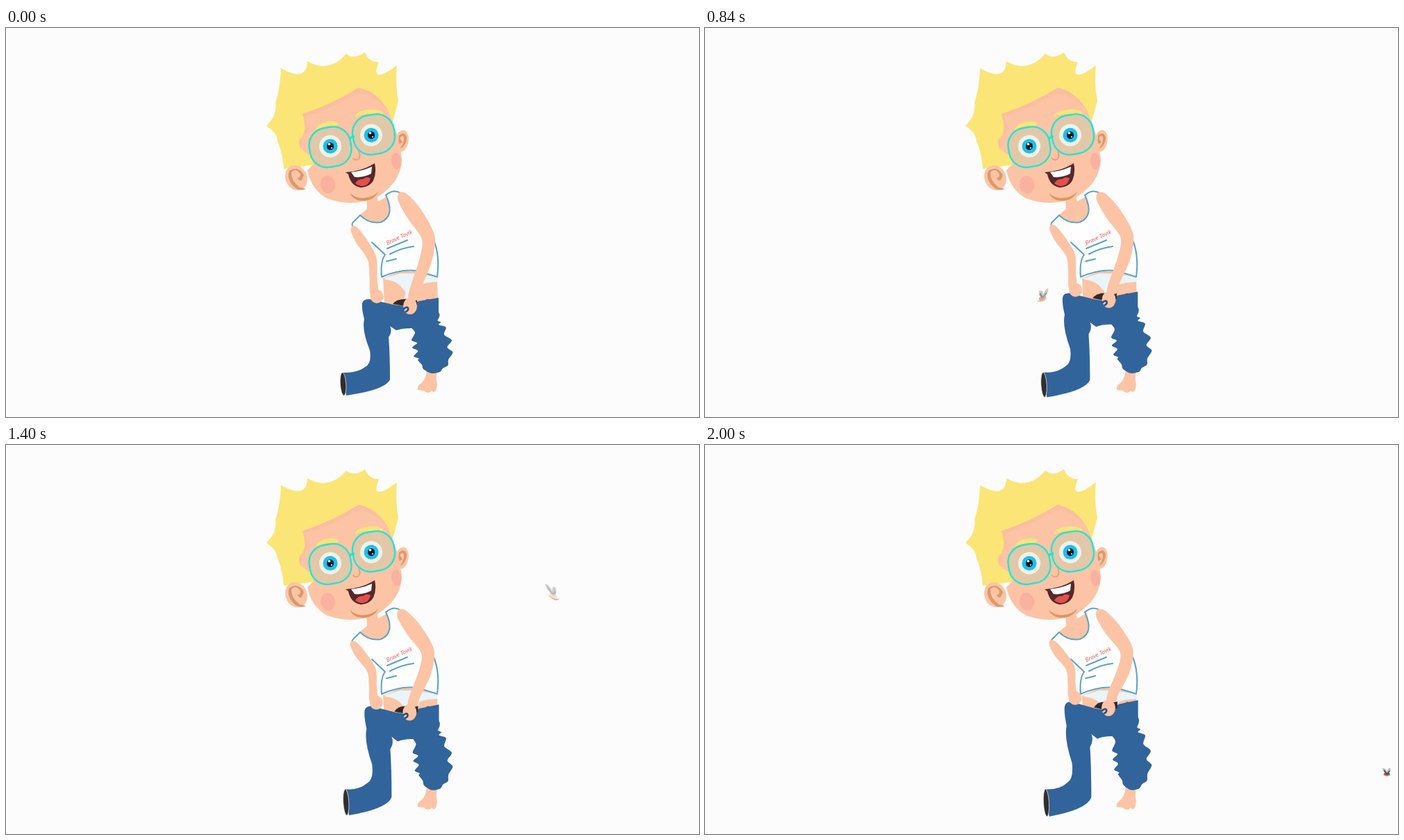
An HTML page for the animation above (2.04 s loop, 998x561 px).

```html
<!DOCTYPE html>
<html lang="en">
<head>
<meta charset="utf-8">
<title>Getting dressed</title>
<style>
  html, body { margin: 0; width: 100%; height: 100%; overflow: hidden; background: #fcfcfc; }
  svg { display: block; width: 100vw; height: 100vh; }
  .skin { fill: #fcc4a5; }
  .hair { fill: #fbe576; }
  .cloth { fill: #31649b; }
  .line { fill: none; stroke: #5aa2c8; stroke-width: 2; stroke-linecap: round; stroke-linejoin: round; }
  .ear { fill: #d99a6c; }
  .blush { fill: #fab1a0; }
  .lens { fill: #e2c8a8; stroke: #1de6d6; stroke-width: 2.4; }
  .shirt-text { font: italic 8.2px "Open Sans", "Noto Sans", sans-serif; fill: #e8574f; }
</style>
</head>
<body>
<svg viewBox="0 0 998 561" preserveAspectRatio="none">
  <defs>
    <g id="eye">
      <circle r="16" fill="#edf3e9"/>
      <circle r="10.5" fill="#1fbfea"/>
      <ellipse rx="5" ry="5.6" fill="#111b26"/>
      <circle cx="-1.5" cy="-3" r="1.8" fill="#fff"/>
      <circle cx="2" cy="2.4" r="1" fill="#fff"/>
    </g>
    <rect id="lens" x="-30" y="-28.500" width="60" height="57" rx="25" transform="rotate(-10)"/>
  </defs>

  <!-- hips and bare foot -->
  <path class="skin" d="M543 361L568 351H592L621 361L622 400L545 402Z"/>
  <path fill="#e9f5fb" d="M544 361L568 354H590L621 360V366Q603 367 596 370L588 390H573Q577 382 574 379Q564 364 547 363Z"/>
  <path class="skin" d="M606 492H622Q618 504 621 514Q619 530 613 523Q608 529 602 523L593 522Q592 516 597 513Q605 507 606 492Z"/>

  <g id="pants">
    <path class="cloth" d="M513 397Q514 391 523 391L558 399L580 402L594 394L623 389V410L600 434Q575 431 562 436L553 430Q557 438 551 446Q553 470 553 507Q546 522 490 530L484 497Q505 498 517 489Q527 484 524 465Q512 435 516 420Q512 405 513 397Z"/>
    <path id="wrinkled" class="cloth"/>
    <path fill="#2e2b2b" d="M557 398Q562 391 574 391H592V399L574 401Z"/>
    <ellipse cx="485.500" cy="513.500" rx="4.200" ry="16.600" transform="rotate(-4 485 513)" fill="#302e2f" stroke="#eee" stroke-width=".7"/>
  </g>

  <!-- vest -->
  <path class="skin" d="M519 243L520 261L509 270Q532 286 547 276Q559 264 549 243L536 250L534 243Z"/>
  <path fill="#fefefe" d="M499 284L510 270Q523 283 540 280Q561 271 547 241L558 234L568 238L616 308Q623 328 621 359Q585 342 541 359Q539 336 546 327L527 309Z"/>
  <path class="line" d="M500 289Q497 282 500 280L510 270Q523 283 540 280Q561 271 547 241Q558 232 568 238"/>
  <path class="line" d="M527 309L546 327Q539 336 541 359Q568 347 592 350Q608 355 621 359Q625 328 616 306"/>
  <path class="line" d="M549 318L578 306M553 326Q570 317 587 315M548 336.500L562 333"/>
  <text class="shirt-text" transform="translate(549 313) rotate(-25)">Brave Tovik</text>

  <path id="armL" class="skin"/>
  <path id="armR" class="skin"/>
  <g id="hands">
    <ellipse class="skin" cx="534" cy="387" rx="9.500" ry="10"/>
    <ellipse class="skin" cx="582" cy="401" rx="10" ry="12"/>
    <path fill="none" stroke="#274f82" stroke-width="2.600" stroke-linecap="round" d="M573 405Q578 401 579 404Q580 407 576 409"/>
  </g>

  <!-- head -->
  <path id="mop" class="hair"/>
  <ellipse class="skin" cx="418" cy="216" rx="15.500" ry="18.500" transform="rotate(-22 418 216)"/>
  <path class="ear" d="M408 206Q421 198 429 212Q428 216 425 220Q421 220 420 216Q424 216 424 211Q418 201 411 208Q410 220 423 230L432 232Q421 237 412 226Q404 215 408 206Z"/>
  <ellipse class="skin" cx="570" cy="163" rx="9.500" ry="16" transform="rotate(10 570 163)"/>
  <path class="ear" d="M566 155Q574 148 577 158Q577 169 567 175Q574 165 573 158Q571 153 567 159L571 165L565 168Z"/>
  <path class="skin" d="M427 124Q472 109 508 86Q545 95 557 137Q567 160 570 190Q569 222 535 244Q500 259 463 246Q440 234 434 205L443 196L440 184Q423 178 422 164Q438 152 427 124Z"/>
  <path fill="#f9bda0" d="M427 124Q472 109 508 86Q536 92 552 122Q525 90 502 96Q472 115 431 128L437 146Q426 157 425 176Q418 160 427 156Q433 145 427 124Z" opacity=".7"/>
  <ellipse class="blush" cx="463.500" cy="226" rx="10.500" ry="13" transform="rotate(-12 463 226)"/>
  <ellipse class="blush" cx="562" cy="192" rx="7" ry="12" transform="rotate(-5 562 192)"/>
  <path class="hair" d="M444 150Q449 137 463 135Q475 133 479 138Q476 143 466 141Q454 141 444 150Z"/>
  <path class="hair" d="M503 129Q503 121 515 119Q533 115 544 122Q542 126 528 124Q513 123 503 129Z"/>
  <use href="#lens" class="lens" x="0" transform="translate(467 171.700)"/>
  <use href="#lens" class="lens" x="0" transform="translate(529.500 153.500)"/>
  <path d="M495 160Q498 156 502 157" fill="none" stroke="#1de6d6" stroke-width="3"/>
  <use href="#eye" x="467" y="170.500"/>
  <use href="#eye" x="526" y="154.500"/>
  <path d="M508 178Q512 187 506 190Q502 191 500 188" fill="none" stroke="#e3a078" stroke-width="1.800" stroke-linecap="round"/>
  <path fill="#57282a" d="M489 208Q512 207 531 195Q534 209 529 220Q524 229 512 230Q497 229 493 211Z"/>
  <path fill="#fff" d="M497 208Q514 206 527 200L526 210Q515 216 502 215Z"/>
  <path fill="#e4504c" d="M503 224Q507 217 514 218Q520 213 525 217Q523 227 513 228Q507 228 503 224Z"/>
  <path fill="#d99660" d="M495 238Q506 247 517 245Q529 244 536 236Q530 249 514 249Q500 249 495 238Z"/>

  <g id="fly">
    <path id="wings" d="M0 2Q-7-1-6-6Q-1-6 0-1Q2-7 5-6Q7-1 0 2Z"/>
    <path fill="#e9a27e" d="M-7 3Q0 7 7 3Q4 6 0 6Q-4 6-7 3Z"/>
    <g id="bug">
      <ellipse cy="2.500" rx="4.500" ry="2.300" fill="#b5533f"/>
      <path d="M-4-3L0 3L4-2" fill="none" stroke="#3d5557" stroke-width="1.800"/>
    </g>
  </g>
</svg>

<script>
  const LOOP = 2040, STEP = 40, LIFT = 22;
  const $ = id => document.getElementById(id);
  const lerp = (a, b, u) => a.map((v, i) => v + (b[i] - v) * u);

  // Smooth closed curve through points
  function smooth(points) {
    const n = points.length, at = i => points[(i + n) % n];
    let d = "M" + at(0);
    for (let i = 0; i < n; i++) {
      const c1 = at(i).map((v, k) => v + (at(i + 1)[k] - at(i - 1)[k]) / 7);
      const c2 = at(i + 1).map((v, k) => v - (at(i + 2)[k] - at(i)[k]) / 7);
      d += `C${c1} ${c2} ${at(i + 1)}`;
    }
    return d + "Z";
  }

  // Rounded limb along joints [x, y, radius]
  function limb(joints) {
    const last = joints.length - 1, left = [], right = [];
    joints.forEach(([x, y, r], i) => {
      const a = joints[Math.max(0, i - 1)], b = joints[Math.min(last, i + 1)];
      const len = Math.hypot(b[0] - a[0], b[1] - a[1]);
      const ux = (b[0] - a[0]) / len * r, uy = (b[1] - a[1]) / len * r;
      if (i === 0) left.push([x - ux, y - uy]);
      left.push([x + uy, y - ux]);
      right.unshift([x - uy, y + ux]);
      if (i === last) left.push([x + ux / 3, y + uy / 3]);
    });
    return smooth([...left, ...right]);
  }

  // Trouser leg with folds that are strongest in the middle
  function wrinkled(joints, folds, depth) {
    const rows = Array.from({ length: folds + 1 }, (_, i) => {
      const u = i / folds * (joints.length - 1), j = Math.min(joints.length - 2, Math.floor(u));
      const [x, y, r] = lerp(joints[j], joints[j + 1], u - j);
      return [x, y, r + depth * Math.sin(Math.PI * i / folds) * (i % 2 ? 1 : -1)];
    });
    return limb(rows);
  }

  // Hair tips [x, y, depth of the hollow that follows]
  function tufts(tips) {
    const center = [475, 140];
    return tips.reduce((d, tip, i) => {
      const next = tips[(i + 1) % tips.length], mid = lerp(tip.slice(0, 2), next, 0.5);
      return d + `Q${lerp(mid, center, 2 * tip[2])} ${next.slice(0, 2)}`;
    }, "M" + tips[0].slice(0, 2)) + "Z";
  }

  $("mop").setAttribute("d", tufts([
    [563, 54, .18], [537, 49, .04], [517, 35, .05], [490, 37, .12], [434, 48, .15],
    [396, 58, .02], [388, 108, .05], [375, 141, .04], [391, 163, .02], [400, 203, 0],
    [445, 197, 0], [556, 138, 0], [565, 105, .02]
  ]));
  $("wrinkled").setAttribute("d", wrinkled(
    [[606, 408, 17], [604, 428, 20], [613, 452, 25], [616, 476, 25], [613, 494, 12]], 13, 4));

  const arms = {
    armL: [[501, 290, 5], [511, 306, 7.5], [527, 332, 6.5], [529, 360, 5.5], [530, 382, 6]],
    armR: [[571, 244, 8], [588, 268, 11.5], [608, 302, 9.5], [604, 336, 9], [590, 374, 7.5], [586, 390, 7]]
  };

  // Lower parts of an arm follow the hand more closely
  const raise = (joints, k) => joints.map(([x, y, r]) =>
    [x - k, y - LIFT * k * Math.max(0, (y - 240) / 150) ** 1.5, r]);

  // Flight path: time, x, y
  const flight = [
    [80, 13, 500], [280, 198, 526], [600, 391, 483], [1040, 567, 272],
    [1260, 694, 125], [1400, 787, 213], [1680, 895, 442], [2000, 982, 472]
  ];

  function slope(i, k) {
    const rate = j => (flight[j + 1][k] - flight[j][k]) / (flight[j + 1][0] - flight[j][0]);
    if (i === 0) return rate(0);
    if (i === flight.length - 1) return rate(i - 1);
    const a = rate(i - 1), b = rate(i);
    return a * b <= 0 ? 0 : 2 * a * b / (a + b);
  }

  function flyAt(t, k) {
    const next = flight.findIndex(p => p[0] >= t);
    const i = next < 0 ? flight.length - 2 : Math.max(0, next - 1);
    const p = flight[i], q = flight[i + 1];
    const span = q[0] - p[0], u = (t - p[0]) / span, v = 1 - u;
    return p[k] * v * v * (1 + 2 * u) + q[k] * u * u * (3 - 2 * u)
      + span * u * v * (slope(i, k) * v - slope(i + 1, k) * u);
  }

  // The fly smears along its course when it is fast
  function drawFly(t) {
    $("fly").style.display = t < 80 ? "none" : "";
    if (t < 80) return;
    const dx = flyAt(t + 10, 1) - flyAt(t - 10, 1);
    const dy = flyAt(t + 10, 2) - flyAt(t - 10, 2);
    const turn = Math.atan2(dy, dx) * 180 / Math.PI;
    const smear = Math.min(1, Math.max(0, Math.hypot(dx, dy) - 8) / 8);
    $("fly").setAttribute("transform", `translate(${flyAt(t, 1)} ${flyAt(t, 2)})
      rotate(${turn}) scale(${1 + smear} 1) rotate(${-turn})`);
    $("bug").setAttribute("opacity", 1 - 0.85 * smear);
    $("wings").setAttribute("fill", smear > 0.3 ? "#cdccc5" : "#b4c4c3");
  }

  function draw(t) {
    const k = t / 2000;
    $("pants").setAttribute("transform",
      `translate(641 500) scale(${1 - 0.038 * k} ${1 + 0.19 * k}) translate(-641 -500)`);
    for (const id in arms) $(id).setAttribute("d", limb(raise(arms[id], k)));
    $("hands").setAttribute("transform", `translate(${-k} ${-LIFT * k})`);
    drawFly(t);
  }

  const start = performance.now();
  function tick() {
    const t = Math.floor((performance.now() - start) % LOOP / STEP) * STEP;
    draw(t < 80 ? 0 : t);
    requestAnimationFrame(tick);
  }
  tick();
</script>
</body>
</html>
```
